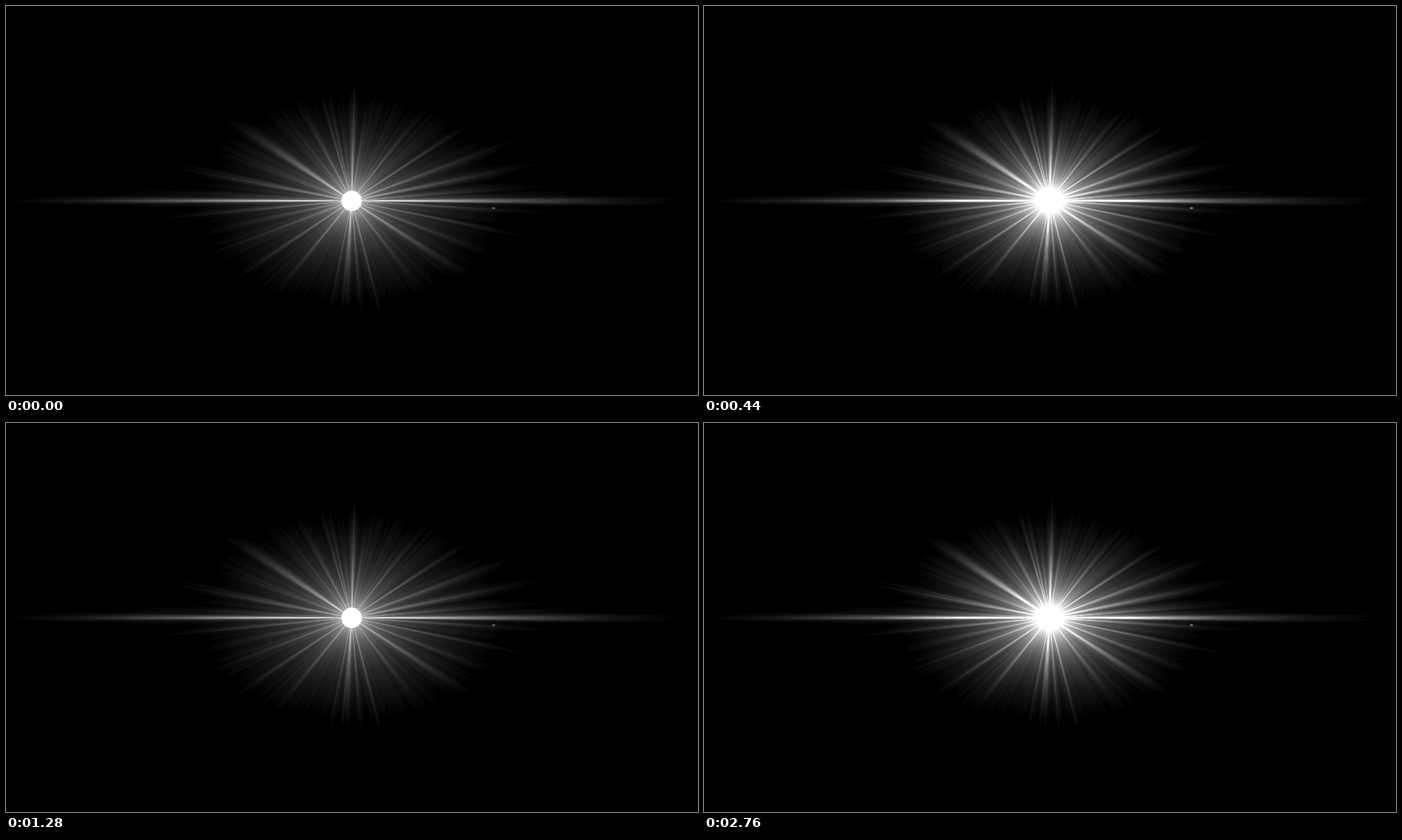
Recreate the animation shown at these times as an HTML page with a canvas. Size 997x561 px, loop 2880 ms.

```html
<!DOCTYPE html>
<html>
<head>
<meta charset="utf-8">
<style>
  html, body { margin: 0; width: 100%; height: 100%; overflow: hidden; background: #000; }
  canvas { display: block; }
</style>
</head>
<body>
<canvas id="stage" width="997" height="561"></canvas>
<script>
const W = 997, H = 561, CX = 498, CY = 281, LOOP = 2880;
const BINS = 7200, TAU = Math.PI * 2;
const ctx = document.getElementById('stage').getContext('2d');

// Beams: tip x, tip y, angular width in degrees, strength
const upper = [
  [195, 216, 0.7, .16], [225, 230, 1.2, .24], [285, 200, 1.5, .17],
  [293, 150, 0.7, .20], [318, 158, 2.6, .36], [380, 134, 0.9, .20],
  [414, 124, 1.8, .20], [448, 108, 1.0, .24], [462, 118, 0.8, .18],
  [480, 128, 0.9, .14], [502, 98, 2.4, .36], [524, 120, 1.2, .24],
  [597, 152, 1.3, .25], [575, 160, 1.0, .16], [668, 168, 1.1, .30],
  [755, 186, 1.3, .24], [790, 221, 1.6, .30], [805, 256, 1.1, .26]
];
const lower = [
  [800, 299, 1.1, .22], [785, 339, 0.8, .28], [708, 361, 1.1, .22],
  [682, 401, 2.2, .34], [606, 420, 1.0, .26], [541, 450, 1.2, .24],
  [512, 450, 1.0, .22], [488, 446, 2.6, .42], [464, 450, 1.0, .22],
  [394, 409, 1.4, .24], [322, 398, 1.0, .28], [285, 361, 1.2, .24],
  [255, 330, 1.2, .22], [195, 308, 1.1, .24]
];
const level = [
  [-4, 281, 0.75, .56], [1001, 282, 0.75, .56],
  [120, 277, 2.2, .30], [875, 278, 2.2, .30]
];

const clamp = v => Math.max(0, Math.min(1, v));
const hash = n => { const v = Math.sin(n * 127.1 + 11.7) * 43758.5453; return v - Math.floor(v); };

// Periodic smooth noise around the circle
function noise(turn, cells, seed) {
  const x = turn * cells, i = Math.floor(x), f = x - i, k = f * f * (3 - 2 * f);
  const at = n => hash((n % cells) + seed);
  return at(i) * (1 - k) + at(i + 1) * k;
}

const beams = [...upper, ...lower, ...level].map(([x, y, w, a]) => ({
  dir: Math.atan2(y - CY, x - CX),
  len: Math.hypot(x - CX, y - CY),
  w: w * Math.PI / 180, a
}));

const spokes = Array.from({ length: BINS }, (_, i) => {
  const turn = i / BINS, ang = turn * TAU;
  const fine = noise(turn, 900, 40), mid = noise(turn, 220, 2000);
  const oval = 1 / Math.hypot(Math.cos(ang) / 232, Math.sin(ang) / 158);
  const active = [];
  for (const b of beams) {
    const d = Math.atan2(Math.sin(ang - b.dir), Math.cos(ang - b.dir)) / b.w;
    const k = b.a * Math.exp(-d * d) * (.72 + .32 * fine + .24 * mid);
    if (k > .004) active.push([k, b.len * (.93 + .1 * fine)]);
  }
  return { reach: oval * (.9 + .1 * fine + .12 * mid), gain: .34 + .06 * mid, active };
});

function light(dx, dy, r) {
  const turn = (Math.atan2(dy, dx) / TAU + 1) % 1;
  const s = spokes[Math.floor(turn * BINS) % BINS];
  let v = .62 * Math.exp(-r / 22);
  if (r < s.reach) v += s.gain * Math.pow(1 - r / s.reach, 1.5);
  for (const [k, len] of s.active) if (r < len) v += k * Math.pow(1 - r / len, 1.3);
  return v;
}

function build() {
  const make = () => ctx.createImageData(W, H);
  const out = { normal: make(), bright: make(), dim: make() };
  const put = (img, p, v) => {
    const g = Math.round(255 * v);
    img.data[p] = img.data[p + 1] = img.data[p + 2] = g < 5 ? 0 : g;
    img.data[p + 3] = 255;
  };
  for (let y = 0; y < H; y++) for (let x = 0; x < W; x++) {
    const dx = x + .5 - CX, dy = y + .5 - CY, r = Math.hypot(dx, dy);
    let v = Math.abs(dy) < 190 ? light(dx, dy, r) : 0;
    const speck = clamp(1.4 - Math.hypot((x - 702) / 2.5, (y - 291) / 1.5));
    v = Math.max(v, .45 * speck);
    const disc = clamp((16 - r) / 1.5);
    const boost = 1 + .8 * clamp(1 - Math.hypot(dx / 260, dy / 150));
    const hot = clamp(v * boost);
    const p = (y * W + x) * 4;
    put(out.normal, p, Math.max(Math.min(v, .87), disc));
    put(out.bright, p, Math.max(hot, disc));
    put(out.dim, p, .465 * Math.max(hot, disc));
  }
  return out;
}

// Flicker: start time and state
const flicker = [
  [0, 'normal'], [120, 'bright'], [240, 'dim'], [320, 'normal'],
  [440, 'bright'], [520, 'dim'], [640, 'normal'], [1080, 'bright'],
  [1280, 'normal'], [1800, 'bright'], [1920, 'dim'], [2000, 'normal'],
  [2760, 'bright']
];

const looks = build();
let shown = '', start = null;

function draw(t) {
  let state = 'normal';
  for (const [at, name] of flicker) if (t >= at) state = name;
  if (state !== shown) ctx.putImageData(looks[shown = state], 0, 0);
}

function tick(now) {
  if (start === null) start = now;
  draw((now - start) % LOOP);
  requestAnimationFrame(tick);
}

draw(0);
requestAnimationFrame(tick);
</script>
</body>
</html>
```
